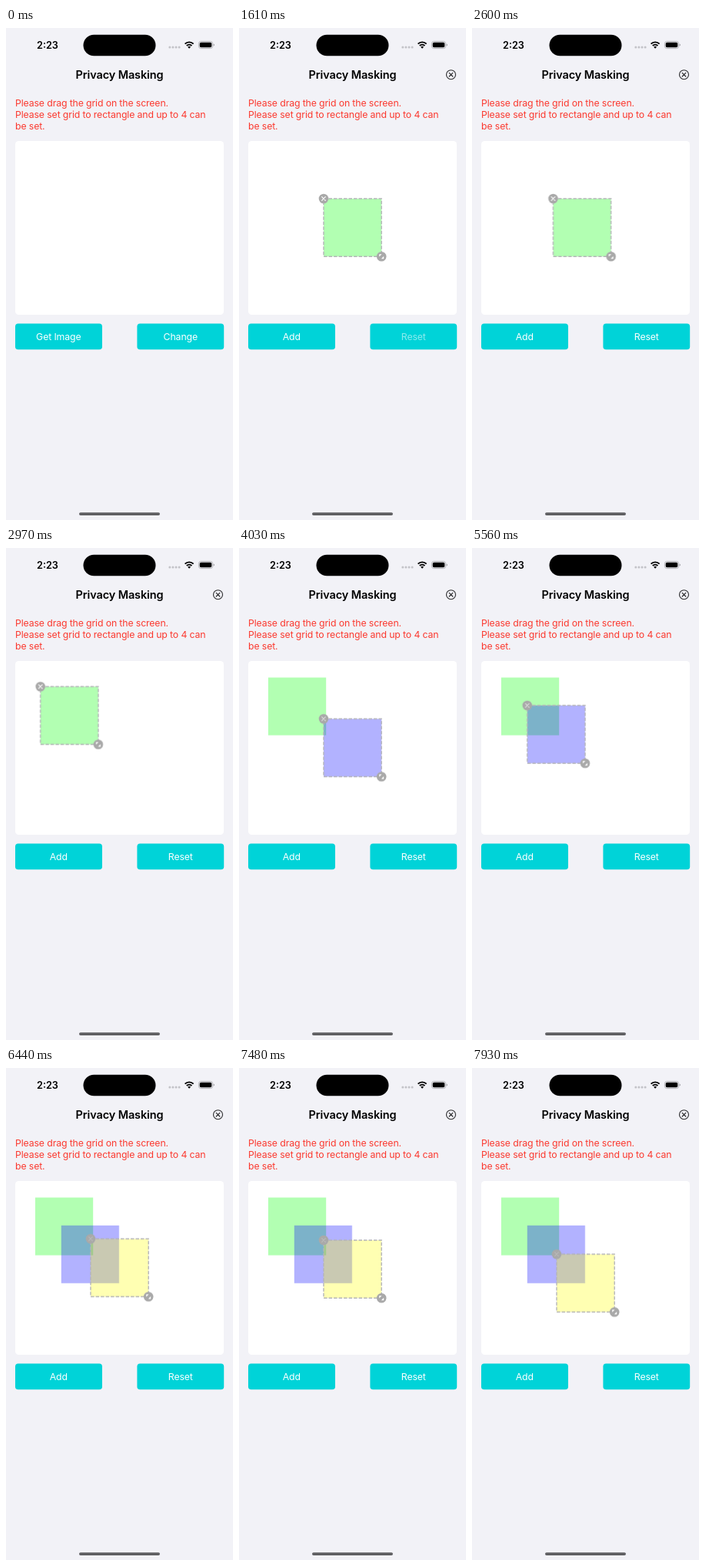
An HTML page that plays this animation: 295x640 px, repeating every 8 s.

```html
<!DOCTYPE html>
<html lang="en">
<head>
<meta charset="utf-8">
<title>Privacy Masking</title>
<style>
  html, body { margin: 0; width: 100%; height: 100%; overflow: hidden; background: #f2f2f7; }
  svg { display: block; width: 295px; height: 640px; font-family: Inter, Roboto, sans-serif; }

  .clock { font-size: 12.7px; font-weight: 600; }
  .title { font-size: 14.5px; font-weight: 600; letter-spacing: -.13px; }
  .hint, .label { font-size: 12.3px; letter-spacing: -.13px; }
  .hint { fill: #fb3a30; }
  .label { fill: #fff; }
  .title, .label { text-anchor: middle; }
  .button { fill: #00d3d8; }

  /* Everything changes in hard steps on one 8 s clock. */
  .view, .edit, .change, .reset, .add, .mask, .grip { animation: 8s step-end infinite; }
  .view { animation-name: view; }
  .edit { animation-name: edit; }
  .change { animation-name: change; }
  .reset { animation-name: reset; }
  .add { animation-name: add; }
  .green { animation-name: green; fill: #0f0; }
  .blue { animation-name: blue; fill: #00f; }
  .yellow { animation-name: yellow; fill: #ff0; }
  .green .grip { animation-name: greenGrip; }
  .blue .grip { animation-name: blueGrip; }
  .blue .cross { opacity: .6; }
  .yellow .cross { opacity: .2; }

  @keyframes view { 0% { opacity: 1 } 20.125%, 100% { opacity: 0 } }
  @keyframes edit { 0% { opacity: 0 } 20.125%, 100% { opacity: 1 } }
  @keyframes change { 0% { opacity: 1 } 6.25%, 100% { opacity: .35 } }
  @keyframes reset { 0% { opacity: .55 } 22.125%, 100% { opacity: 1 } }
  @keyframes add {
    0%, 50.375%, 80.5%, 100% { opacity: 1 }
    48.875%, 79.125% { opacity: .5 }
  }
  @keyframes greenGrip { 0% { opacity: 1 } 48.875%, 100% { opacity: 0 } }
  @keyframes blueGrip { 0% { opacity: 1 } 79.125%, 100% { opacity: 0 } }

  @keyframes green {
    0% { opacity: 0; transform: translate(110px, 222px) }
    20.125% { opacity: 1 }
    32.5% { transform: translate(105.5px, 222px) }
    34% { transform: translate(88px, 211px) }
    35.5% { transform: translate(65px, 195px) }
    37.125% { transform: translate(44.7px, 180.3px) }
    38.625% { transform: translate(40px, 173px) }
    40%, 100% { opacity: 1; transform: translate(38px, 168.5px) }
  }
  @keyframes blue {
    0% { opacity: 0; transform: translate(110px, 222.2px) }
    48.875% { opacity: 1 }
    63.75% { transform: translate(106px, 220px) }
    65.19% { transform: translate(97px, 215px) }
    66.625% { transform: translate(85px, 210px) }
    68.06% { transform: translate(76px, 206.5px) }
    69.5%, 100% { opacity: 1; transform: translate(71.8px, 204.8px) }
  }
  @keyframes yellow {
    0% { opacity: 0; transform: translate(110px, 222.2px) }
    79.125% { opacity: 1 }
    93.5% { transform: translate(110px, 224px) }
    94.94% { transform: translate(110px, 229px) }
    96.31% { transform: translate(110px, 235px) }
    97.69% { transform: translate(110px, 240px) }
    99.125%, 100% { opacity: 1; transform: translate(110px, 242.2px) }
  }
</style>
</head>
<body>
<svg viewBox="0 0 295 640">
  <defs>
    <rect id="area" width="75.2" height="75.2" fill-opacity=".3"/>
    <g id="frame">
      <rect width="75.2" height="75.2" fill="none" stroke="#b4b4b8" stroke-width="1.4" stroke-dasharray="4.5 2"/>
      <g fill="#a9a9a9">
        <circle r="6.3"/>
        <circle cx="75.2" cy="75.2" r="6.3"/>
      </g>
      <g transform="translate(75.2 75.2)" fill="#fff">
        <path d="M-3-3h3.4L-3 .4zM3 3H-.4L3-.4z"/>
      </g>
    </g>
    <path id="cross" d="M-2.3-2.3 2.3 2.3M2.3-2.3-2.3 2.3" fill="none" stroke-width="1.2" stroke-linecap="round"/>
  </defs>

  <rect width="295" height="640" fill="#f2f2f7"/>

  <!-- Status bar -->
  <text class="clock" x="40" y="26.5">2:23</text>
  <rect x="100.5" y="8.7" width="94" height="27.6" rx="13.8"/>
  <g fill="#c3c3c8">
    <circle cx="212.8" cy="25" r="1.5"/>
    <circle cx="216.9" cy="25" r="1.5"/>
    <circle cx="221" cy="25" r="1.5"/>
    <circle cx="225.1" cy="25" r="1.5"/>
  </g>
  <g fill="none" stroke="#000" stroke-width="1.9">
    <path d="M232.6 20.6a7.8 7.8 0 0 1 11 0"/>
    <path d="M234.8 23a4.7 4.7 0 0 1 6.6 0"/>
  </g>
  <path d="M238.1 26.8l-1.9-2a2.7 2.7 0 0 1 3.8 0z"/>
  <rect x="250.4" y="17.4" width="18.2" height="9.2" rx="3" fill="none" stroke="#a4a4a8" stroke-width=".8"/>
  <rect x="251.7" y="18.7" width="15.6" height="6.6" rx="1.8"/>
  <path d="M269.6 20.4q1.4.4 1.4 1.6t-1.4 1.6z" fill="#a4a4a8"/>

  <text class="title" x="147.5" y="65.5">Privacy Masking</text>
  <g class="hint">
    <text x="12" y="101.6">Please drag the grid on the screen.</text>
    <text x="12" y="116.8">Please set grid to rectangle and up to 4 can</text>
    <text x="12" y="132">be set.</text>
  </g>

  <rect x="12" y="147" width="271" height="226" rx="4.5" fill="#fff"/>

  <g class="button">
    <rect x="12" y="384.6" width="113" height="33.6" rx="3.8"/>
    <rect x="170.4" y="384.6" width="112.8" height="33.6" rx="3.8"/>
  </g>
  <g class="view label">
    <text x="68.3" y="406">Get Image</text>
    <text class="change" x="226.8" y="406">Change</text>
  </g>
  <g class="edit label">
    <text class="add" x="68.3" y="406">Add</text>
    <text class="reset" x="226.8" y="406">Reset</text>
    <g transform="translate(275.5 60.7)" stroke="#2c2c2e">
      <circle r="6" fill="none" stroke-width="1.1"/>
      <use href="#cross"/>
    </g>
  </g>

  <!-- Masks -->
  <g class="mask green">
    <use href="#area"/>
    <g class="grip"><use href="#frame"/><use class="cross" href="#cross" stroke="#fff"/></g>
  </g>
  <g class="mask blue">
    <use href="#area"/>
    <g class="grip"><use href="#frame"/><use class="cross" href="#cross" stroke="#fff"/></g>
  </g>
  <g class="mask yellow">
    <use href="#area"/>
    <g class="grip"><use href="#frame"/><use class="cross" href="#cross" stroke="#fff"/></g>
  </g>

  <rect x="95" y="630.2" width="105" height="3.8" rx="1.9" fill="#5f5f62"/>
</svg>
</body>
</html>
```
